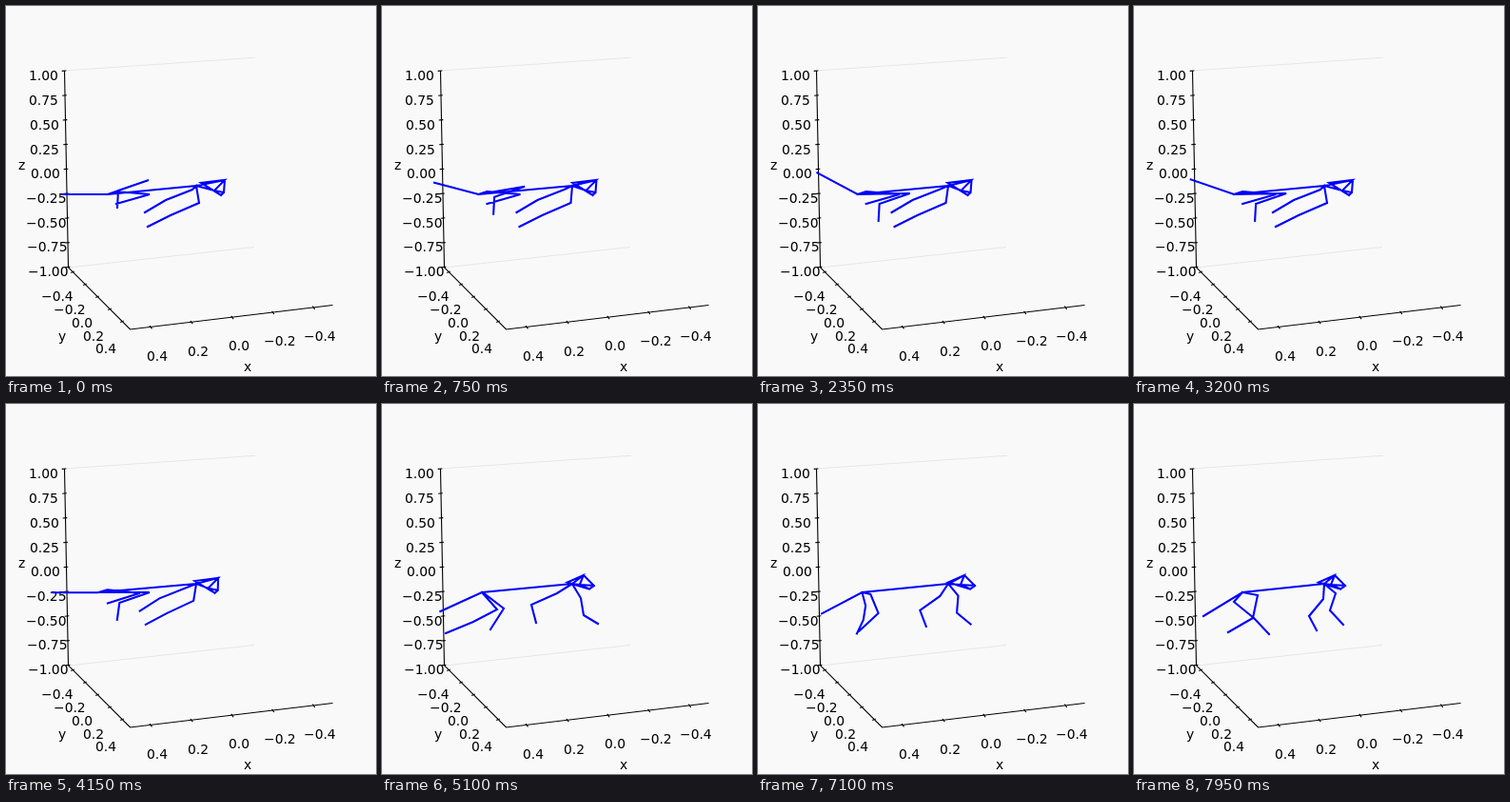
Write an HTML page that moves like this. It is 389x389 px and loops after 8000 ms.

```html
<!DOCTYPE html>
<html lang="en">
<head>
<meta charset="utf-8">
<title>3D skeleton plot</title>
<style>
  html, body { margin: 0; width: 100%; height: 100%; overflow: hidden; background: #f9f9f9; }
  svg { display: block; width: 100%; height: 100%; }
  text { font: 13.89px "DejaVu Sans", sans-serif; fill: #000; }
  path { fill: none; }
  .pane { stroke: #e6e6e6; stroke-width: 1.1; }
  .axis { stroke: #000; stroke-width: 1.1; }
  #bones { stroke: #00f; stroke-width: 2.08; stroke-linecap: square; }
</style>
</head>
<body>
<svg viewBox="0 0 389 389">
  <path class="pane" d="M61.5 68 262 54.3M65.5 275 261 253.5"/>
  <path class="axis" d="M61.5 68 65.5 274.8 130.5 340 343.5 314.5"/>
  <path class="axis" id="ticks"/>
  <g id="labels"></g>
  <path id="bones"/>
</svg>
<script>
const LOOP = 8000, STEP = 50;

// Static axes; labels sit on whole pixels
const labels = document.getElementById('labels');
let ticks = '';

function addText(text, centre, baseline) {
  const node = document.createElementNS('http://www.w3.org/2000/svg', 'text');
  node.textContent = text;
  labels.append(node);
  node.setAttribute('x', Math.round(centre - node.getComputedTextLength() / 2));
  node.setAttribute('y', Math.round(baseline));
}

function addTick(x, y, dx, dy) {
  ticks += `M${x - dx} ${y - dy}L${x + dx} ${y + dy}`;
}

const number = (value, digits) => value.toFixed(digits).replace('-', '\u2212');

for (let i = 0; i < 9; i++) {
  addText(number(1 - i / 4, 2), 39.2 + i * 0.58, 78.4 + i * 25.7);
  addTick(61 + i * 0.5, 68.2 + i * 25.8, 2.3, -0.2);
}
for (let i = 0; i < 5; i++) {
  const value = (i - 2) / 5;
  addText(number(value, 1), 54 + i * 12.8, 310.4 + i * 13.7);
  addTick(70 + i * 13, 279.8 + i * 13, 1.8, -0.7);
  addText(number(-value, 1), 159.5 + i * 42.7, 373.2 - i * 5.4);
  addTick(152.3 + i * 42.8, 337.7 - i * 5.1, 1.2, 1.6);
}
document.getElementById('ticks').setAttribute('d', ticks);
addText('x', 254, 384);
addText('y', 59, 352);
addText('z', 16.5, 172);

// Knee, ankle and foot of each leg: crouched, risen, end of the stride
const hindNear = {
  crouch: [[162, 197], [130, 208], [129, 226]],
  rise: [[121, 216], [96, 229], [67, 241]],
  stride: [[105, 208], [126, 225], [142, 242]]
};
const hindFar = {
  crouch: [[116, 195], [151, 198], [116, 208]],
  rise: [[107, 199], [128, 215], [114, 237]],
  stride: [[130, 201], [125, 225], [99, 240]]
};
const foreFar = {
  crouch: [[191, 193], [163, 204], [141, 217]],
  rise: [[184, 199], [157, 211], [162, 230]],
  stride: [[199, 205], [184, 223], [192, 238]]
};
const foreNear = {
  crouch: [[198, 207], [168, 220], [144, 232]],
  rise: [[209, 204], [212, 222], [227, 231]],
  stride: [[212, 199], [206, 217], [220, 232]]
};

const clamp = u => Math.min(1, Math.max(0, u));
const progress = (t, from, to) => clamp((t - from) / (to - from));
const smooth = u => u * u * (3 - 2 * u);
const mix = (a, b, u) => a + (b - a) * u;
const mixPoint = (p, q, u) => p.map((v, axis) => mix(v, q[axis], u));
const shift = ([x, y], dx, dy = 0) => [x + dx, y + dy];

function skeleton(t) {
  const rise = smooth(progress(t, 4000, 5100));
  const stride = progress(t, 5100, 7950) ** 2;
  const sway = -10 * Math.sin(Math.PI * t / 2800) ** 2 * (1 - rise);
  const nod = 5 * Math.cos(2 * Math.PI * t / 3200);
  const settle = 1 - smooth(progress(t, 0, 1550));

  const neck = [200, 189];
  const hip = [mix(107, 105, rise) + sway + 9 * stride, 198];

  const tailLength = 48;
  const tailDrop = mix(-23 * Math.sin(Math.PI * Math.min(t, 4200) / 4200), 20 + 5 * stride, rise);
  const tail = shift(hip, -Math.sqrt(tailLength ** 2 - tailDrop ** 2), tailDrop);

  const leg = (root, pose, dx, dy = 0) => [root, ...pose.crouch.map((point, i) => {
    const standing = mixPoint(pose.rise[i], pose.stride[i], stride);
    return mixPoint(shift(point, dx, dy), standing, rise);
  })];

  const headPoint = (low, high) => shift(mixPoint(low, high, rise), nod);
  const nape = headPoint([200, 186], [199, 187.5]);
  const crown = headPoint([225, 183], [216, 180]);
  const snout = headPoint([224, 196], [227, 191]);
  const jaw = headPoint([221, 199], [222, 194.5]);
  const cheek = headPoint([214, 194], [212, 190]);

  return [
    [tail, hip, neck],
    leg(hip, hindNear, sway - 12 * settle, -14 * settle),
    leg(hip, hindFar, sway),
    leg(neck, foreFar, nod),
    leg(neck, foreNear, nod),
    [neck, crown, snout, jaw, nape, crown, cheek, jaw],
    [neck, cheek, snout]
  ];
}

const bones = document.getElementById('bones');
const start = performance.now();

function draw(now) {
  const elapsed = Math.max(0, now - start) % LOOP;
  const t = Math.floor(elapsed / STEP) * STEP;
  const path = skeleton(t).map(chain =>
    'M' + chain.map(point => point.map(v => v.toFixed(2)).join(' ')).join('L'));
  bones.setAttribute('d', path.join(''));
  requestAnimationFrame(draw);
}
draw(start);
</script>
</body>
</html>
```
